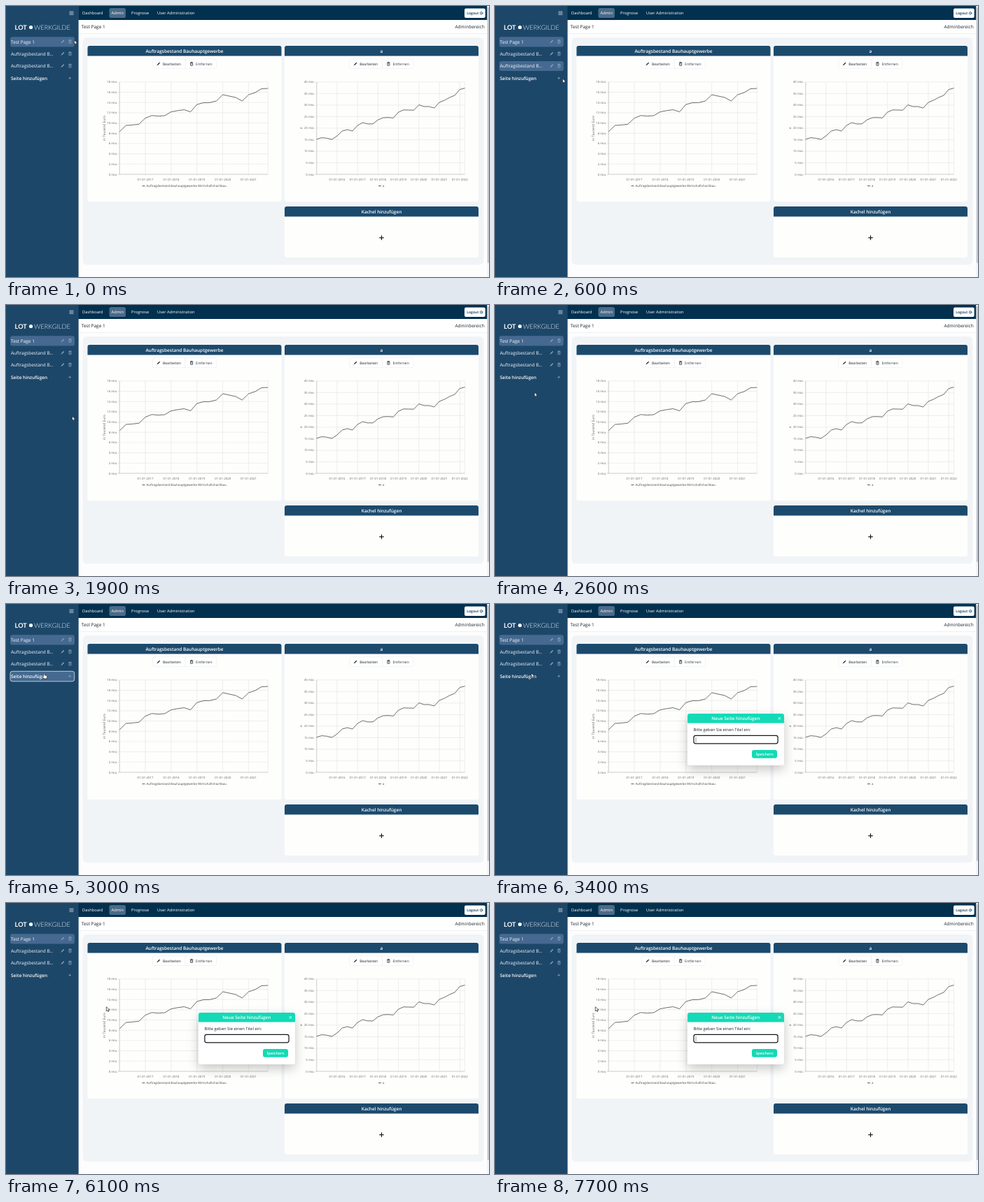
Write an HTML page with a canvas that moves like this. It is 690 by 388 pixels and loops after 8 s.

```html
<!DOCTYPE html>
<html lang="de">
<head>
<meta charset="utf-8">
<title>Adminbereich</title>
<style>
html, body { margin: 0; width: 100%; height: 100%; overflow: hidden; background: #fdfdfd; }
canvas { display: block; }
</style>
</head>
<body>
<canvas id="stage" width="690" height="388"></canvas>
<script>
const ctx = document.getElementById('stage').getContext('2d');
const LOOP = 8000, STEP = 100;
const SCALE = 690 / 1920; // page pixels to stage pixels
const C = {
  side: '#1d4769', nav: '#02304f', card: '#1c4a6d', active: '#456990',
  panel: '#f1f4f7', white: '#fefefd', teal: '#13dab6', ink: '#1c2329',
  icon: '#92a9bf', axis: '#666', grid: '#e3e3e3'
};

// y is the middle of the capitals, size is in page pixels
function text(s, x, y, size, color, { weight = 400, align = 'left', family = '"Open Sans"', turn = 0 } = {}) {
  ctx.save();
  ctx.translate(x, y);
  ctx.rotate(turn);
  ctx.scale(SCALE, SCALE);
  ctx.font = `${weight} ${size}px ${family}, sans-serif`;
  ctx.textRendering = 'geometricPrecision';
  ctx.textAlign = align;
  ctx.fillStyle = color;
  ctx.fillText(s, 0, size * 0.357);
  ctx.restore();
}

function rect(x0, y0, x1, y1, fill, r = 0, stroke = null, width = 0.5) {
  ctx.beginPath();
  ctx.roundRect(x0, y0, x1 - x0, y1 - y0, r);
  if (fill) { ctx.fillStyle = fill; ctx.fill(); }
  if (stroke) { ctx.strokeStyle = stroke; ctx.lineWidth = width; ctx.stroke(); }
}

function line(points, color, width) {
  ctx.beginPath();
  points.forEach(([x, y], i) => i ? ctx.lineTo(x, y) : ctx.moveTo(x, y));
  ctx.strokeStyle = color;
  ctx.lineWidth = width;
  ctx.stroke();
}

function plus(x, y, r, color, width) {
  line([[x - r, y], [x + r, y]], color, width);
  line([[x, y - r], [x, y + r]], color, width);
}

function pencil(x, y, color) {
  line([[x - 1.5, y + 1.5], [x + 1.7, y - 1.7]], color, 1.3);
  line([[x - 2.4, y + 2.4], [x - 1.4, y + 1.4]], color, 0.8);
}

function trash(x, y, color) {
  line([[x - 2.2, y - 1.9], [x + 2.2, y - 1.9]], color, 0.7);
  line([[x - 0.8, y - 2.5], [x + 0.8, y - 2.5]], color, 0.6);
  rect(x - 1.6, y - 1.2, x + 1.6, y + 2.5, null, 0.4, color, 0.7);
  line([[x, y - 0.6], [x, y + 1.8]], color, 0.5);
}

function nav() {
  rect(103.5, 0, 690, 20, C.nav);
  rect(147.5, 3, 171, 17, '#4a6a88', 2.5);
  [['Dashboard', 109], ['Admin', 150.5], ['Prognose', 179], ['User Administration', 216]]
    .forEach(([s, x]) => text(s, x, 10.2, 16, '#fff', { weight: 500 }));
  rect(655, 3.5, 684.7, 17, '#fff', 2);
  text('Logout', 658.3, 10.3, 14, C.nav, { weight: 600 });
  ctx.beginPath();
  ctx.arc(679, 10.3, 1.8, 0.7, 5.6);
  ctx.strokeStyle = C.nav;
  ctx.lineWidth = 0.7;
  ctx.stroke();
  line([[678.6, 10.3], [681.3, 10.3]], C.nav, 0.7);
  line([[680.4, 9.4], [681.3, 10.3], [680.4, 11.2]], C.nav, 0.6);

  rect(103.5, 20, 690, 39.5, '#fff');
  line([[103.5, 39.6], [687, 39.6]], '#e4e6e9', 0.6);
  text('Test Page 1', 107.8, 30, 18, C.ink);
  text('Adminbereich', 683.6, 30, 18, C.ink, { align: 'right' });
  rect(687.2, 0, 690, 388, '#f3f3f3');
  rect(687.8, 2, 689.8, 368, '#bfc1c4', 1);
}

function sidebar(t) {
  rect(0, 0, 103.5, 388, C.side);
  for (const y of [8.2, 10.2, 12.2]) line([[90.5, y], [96.5, y]], '#d5dfe8', 0.8);

  text('LOT', 12.6, 30.6, 25.6, '#fff', { weight: 700, family: 'Lato' });
  ctx.beginPath();
  ctx.arc(35.6, 30.5, 2.6, 0, 7);
  ctx.fillStyle = '#fff';
  ctx.fill();
  text('WERKGILDE', 40, 30.6, 25.6, '#e6edf3', { weight: 300, family: 'Lato' });

  rect(6, 44.3, 98, 58.5, C.active, 3);
  if (t >= 600 && t < 700) rect(6, 79, 98, 93, C.active, 3);
  if (t >= 2800 && t < 3400)
    rect(6, 96.3, 97.7, 110.8, C.active, 3, t >= 2900 ? '#dfe7ee' : null, 0.8);

  ['Test Page 1', 'Auftragsbestand B...', 'Auftragsbestand B...'].forEach((s, i) => {
    const y = 51.4 + i * 17.3;
    text(s, 7, y, 18, '#f4f7fa');
    pencil(81, y - 0.5, C.icon);
    trash(91.5, y - 0.5, C.icon);
  });
  text('Seite hinzufügen', 7, 103.4, 18, '#fff', { weight: 600 });
  plus(91.2, 103.3, 1.8, C.icon, 0.7);
}

function card(x, y, bottom, title) {
  rect(x, y, x + 277, bottom, C.white, 3);
  rect(x, y, x + 277, y + 14.5, C.card, [3, 3, 0, 0]);
  text(title, x + 138.5, y + 7.3, 18, '#fff', { weight: 600, align: 'center' });
}

function buttons(x) {
  rect(x, 76, x + 46.7, 89.5, '#fff', [2, 0, 0, 2], '#e6e8ea');
  rect(x + 46.7, 76, x + 91, 89.5, '#fff', [0, 2, 2, 0], '#e6e8ea');
  pencil(x + 8.5, 82.8, C.ink);
  text('Bearbeiten', x + 14.4, 82.8, 14.1, C.ink, { weight: 500 });
  trash(x + 55.6, 82.8, C.ink);
  text('Entfernen', x + 61.6, 82.8, 14.1, '#30373d', { weight: 500 });
}

// One value per quarter; heights are stage coordinates
function chart({ left, right, max, tick, quarter, firstYear, heights, axisName, axisX, legend, legendX }) {
  const top = 108.8, base = 241, rows = max / tick;
  for (let i = 0; i <= rows; i++) {
    const y = base - (base - top) * i / rows;
    line([[left - 2, y], [right, y]], i ? C.grid : '#aaa', 0.6);
    text(`${i * tick} mio.`, left - 3, y, 12, C.axis, { align: 'right' });
  }
  line([[left, top], [left, base]], '#aaa', 0.6);
  line([[right, top], [right, base]], C.grid, 0.6);
  for (let i = 4; i < heights.length; i += 4) {
    const x = left + i * quarter;
    line([[x, top], [x, base + 2]], C.grid, 0.6);
    text(`01-01-${firstYear + i / 4}`, x, 248, 12.3, C.axis, { align: 'center' });
  }
  line(heights.map((y, i) => [left + i * quarter, y]), '#3c3c3c', 0.75);
  text(axisName, axisX, 175, 13.4, C.axis, { align: 'center', turn: -Math.PI / 2 });
  line([[legendX, 257.6], [legendX + 4, 257.6]], '#333', 0.8);
  text(legend, legendX + 6, 257.5, 12.2, '#444');
}

const orders = {
  left: 162.2, right: 374.3, max: 18, tick: 2, quarter: 9.22, firstYear: 2016,
  heights: [180, 171, 170.3, 169.3, 160.5, 156.8, 157.7, 157, 151.5, 149.8, 148.5, 151.5,
    141, 138.5, 138.3, 136, 127, 129, 131, 136, 127, 124, 118.5, 118],
  axisName: 'in Tausend Euro', axisX: 140,
  legend: 'Auftragsbestand Bauhauptgewerbe Wirtschaftshochbau', legendX: 194.5
};
const second = {
  left: 443.8, right: 655.6, max: 40, tick: 5, quarter: 7.303, firstYear: 2015,
  heights: [190.7, 188.6, 189.3, 191, 186, 179, 177, 179, 171, 167, 168.8, 168.8, 163, 160, 159.7,
    160.3, 152, 148.8, 149, 149.2, 141.5, 144, 144, 146, 138, 135, 131, 128, 119.5, 117.6],
  axisName: 'a', axisX: 421, legend: 'a', legendX: 532
};

function page() {
  rect(103.5, 39, 690, 388, '#fdfdfd');
  rect(109.5, 45, 682.5, 370.5, C.panel, 6);
  card(116.5, 57, 280, 'Auftragsbestand Bauhauptgewerbe');
  card(398, 57, 280, 'a');
  card(398, 287, 360, 'Kachel hinzufügen');
  buttons(209.5);
  buttons(490.8);
  chart(orders);
  chart(second);
  plus(536.5, 331.8, 3.3, '#15191d', 1.2);
}

function dialog(t) {
  ctx.save();
  ctx.shadowColor = 'rgba(0,0,0,.22)';
  ctx.shadowBlur = 16;
  ctx.shadowOffsetY = 6;
  rect(275, 157, 413, 231, '#fff', 3);
  ctx.restore();
  rect(275, 157, 413, 170.5, C.teal, [3, 3, 0, 0]);
  text('Neue Seite hinzufügen', 343.8, 164, 17.6, '#fff', { weight: 600, align: 'center' });
  line([[404.6, 162], [408.2, 165.6]], '#fff', 0.9);
  line([[408.2, 162], [404.6, 165.6]], '#fff', 0.9);
  text('Bitte geben Sie einen Titel ein:', 283.4, 179.7, 16.3, C.ink);
  rect(283.9, 188.4, 404.1, 199.8, '#fff', 2.8, '#14181c', 1.2);
  if (Math.floor((t - 3350) / 533) % 2 === 0) line([[287, 191], [287, 198]], '#555', 0.6);
  rect(367, 209, 403, 220.7, C.teal, 3);
  text('Speichern', 385, 214.9, 14.6, '#fff', { weight: 600, align: 'center' });
}

// Pointer path: time, x, y
const path = [
  [0, 97.5, 48.7], [500, 97.5, 48.7], [600, 96.6, 104], [700, 102, 131], [800, 98.5, 150],
  [900, 94.5, 159], [1900, 94.6, 159.2], [2100, 95, 172], [2200, 82, 175], [2400, 64, 155],
  [2700, 52.5, 110], [2800, 54, 99], [3300, 54, 99], [3400, 52, 99], [3800, 52, 99]
];

function pointerAt(t) {
  if (t >= 3800) {
    const p = Math.min(1, (t - 3800) / 700), e = p * p * (3 - 2 * p);
    return [52 + 91.3 * e, 99 + 49.6 * e];
  }
  const i = path.findIndex(p => p[0] > t);
  const [t0, x0, y0] = path[i - 1], [t1, x1, y1] = path[i];
  const k = (t - t0) / (t1 - t0);
  return [x0 + (x1 - x0) * k, y0 + (y1 - y0) * k];
}

function pointer(t) {
  const [x, y] = pointerAt(t);
  const hand = t >= 2800 && t < 3400;
  const shape = hand
    ? 'M0 0Q1 -.6 1.6 .3V3L4 3.5Q5 3.8 4.8 5L4 8H.6L-1.7 5.2Q-1.5 4 -.2 4.8Z'
    : 'M0 0V6.2L1.5 4.9L2.5 7L3.5 6.5L2.6 4.5H4.5Z';
  ctx.save();
  ctx.translate(x, y);
  const p = new Path2D(shape);
  ctx.lineJoin = 'round';
  ctx.lineWidth = 0.7;
  ctx.strokeStyle = '#16202a';
  ctx.fillStyle = '#fff';
  ctx.fill(p);
  ctx.stroke(p);
  ctx.restore();
}

function draw(now) {
  const t = Math.floor((now % LOOP) / STEP) * STEP;
  page();
  nav();
  sidebar(t);
  if (t >= 3400) dialog(t);
  pointer(t);
}

let start = null;
function tick(now) {
  start ??= now;
  draw(now - start);
  requestAnimationFrame(tick);
}
draw(0);
requestAnimationFrame(tick);
</script>
</body>
</html>
```
